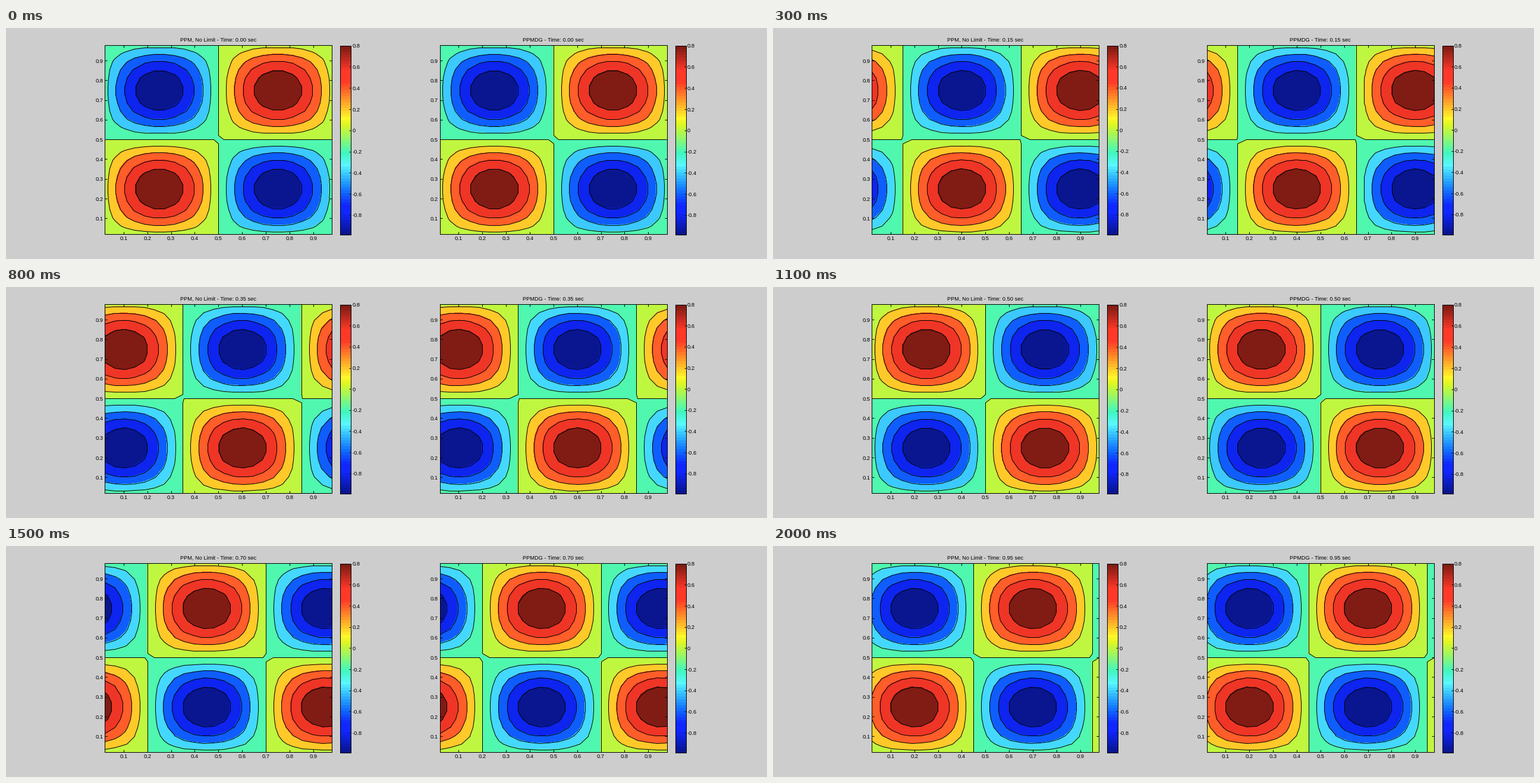
Recreate the animation shown at these times as a matplotlib script. Size 1280 by 390 pixels, loop 2.1 s.

```python
import numpy as np
import matplotlib.pyplot as plt
from matplotlib.animation import FuncAnimation
from matplotlib.colors import ListedColormap

W, H, DPI = 1280, 390, 100
PX = 72 / DPI  # one pixel in points

plt.rcParams.update({
    "font.family": "Liberation Sans",
    "font.size": 9.3 * PX,
    "axes.unicode_minus": False,
    "axes.linewidth": PX,
    "axes.axisbelow": False,
})

# Cell centres of a 24 x 24 grid on the unit square
N = 24
cells = (np.arange(N) + 0.5) / N
X, Y = np.meshgrid(cells, cells)

# Zero is nudged up so that negative regions join at the saddles
STEPS = np.round(np.arange(-0.8, 0.81, 0.2), 1)
LEVELS = np.where(STEPS == 0, 1e-7, STEPS)
EDGES = [-1.1, *LEVELS, 1.1]

TICKS = 21
DT = 0.05
HELD = {1, 9, 18}  # steps that keep the picture before them


def jet(n=64):
    """Jet ramps, with a little bleed between the channels."""
    i = np.arange(n)
    r, g, b = (np.clip(1.5 - abs(i - c) / 16, 0, 1) for c in (47, 31, 15))
    return np.column_stack([
        np.maximum(r, np.maximum(0.06 * b, 0.35 * g * g * b)),
        np.maximum(0.97 * g, np.maximum(0.22 * r, 0.15 * b)),
        np.maximum(b, 0.16 * r),
    ])


JET = jet()


def pixel_axes(left, top, width, height):
    return fig.add_axes([left / W, 1 - (top + height) / H, width / W, height / H])


class Panel:
    def __init__(self, left, name):
        self.name = name
        self.ax = ax = pixel_axes(left, 28.7, 382, 319)
        ticks = np.arange(1, 10) / 10
        ax.set(xlim=cells[[0, -1]], ylim=cells[[0, -1]], xticks=ticks, yticks=ticks)
        ax.tick_params(direction="in", top=True, right=True,
                       length=4 * PX, width=PX)
        ax.tick_params(axis="x", pad=3 * PX)
        ax.tick_params(axis="y", pad=3 * PX)
        self.title = fig.text((left + 191) / W, 1 - 22.7 / H, "", ha="center")

        self.bar = bar = pixel_axes(left + 396, 29.7, 18, 319)
        self.strip = bar.imshow(np.arange(64)[:, None], origin="lower",
                                cmap=ListedColormap(JET), aspect="auto",
                                interpolation="nearest")
        bar.set_xticks([])
        bar.set_yticks(STEPS, [f"{v:g}" if v else "0" for v in STEPS])
        bar.yaxis.tick_right()
        bar.tick_params(axis="y", direction="in", length=3 * PX,
                        width=PX, pad=2 * PX)
        self.sets = []

    def draw(self, t, z):
        for s in self.sets:
            s.remove()
        low, high = z.min(), STEPS[-1]
        index = np.clip((STEPS - low) / (high - low) * 64, 0, 63).astype(int)
        fill = self.ax.contourf(X, Y, z, EDGES, colors=JET[[0, *index]],
                                antialiased=False)
        lines = self.ax.contour(X, Y, z, LEVELS, colors="k", linewidths=PX,
                                linestyles="solid")
        lines.set_snap(True)
        self.sets = [fill, lines]
        self.strip.set_extent((0, 1, low, high))
        self.bar.set_ylim(low, high)
        self.title.set_text(f"{self.name} - Time: {t:.2f} sec")


def sim_time(tick):
    step = tick - (tick > 3)
    return DT * (step - (step in HELD))


def update(tick):
    t = sim_time(tick)
    z = np.sin(2 * np.pi * (X - t)) * np.sin(2 * np.pi * Y)
    for p in panels:
        p.draw(t, z)
    return []


fig = plt.figure(figsize=(W / DPI, H / DPI), dpi=DPI, facecolor="0.804")
panels = [Panel(166.3, "PPM, No Limit"), Panel(729.8, "PPMDG")]
anim = FuncAnimation(fig, update, frames=TICKS, init_func=lambda: update(0),
                     interval=100, repeat=True, repeat_delay=0, blit=False)
plt.show()
```
